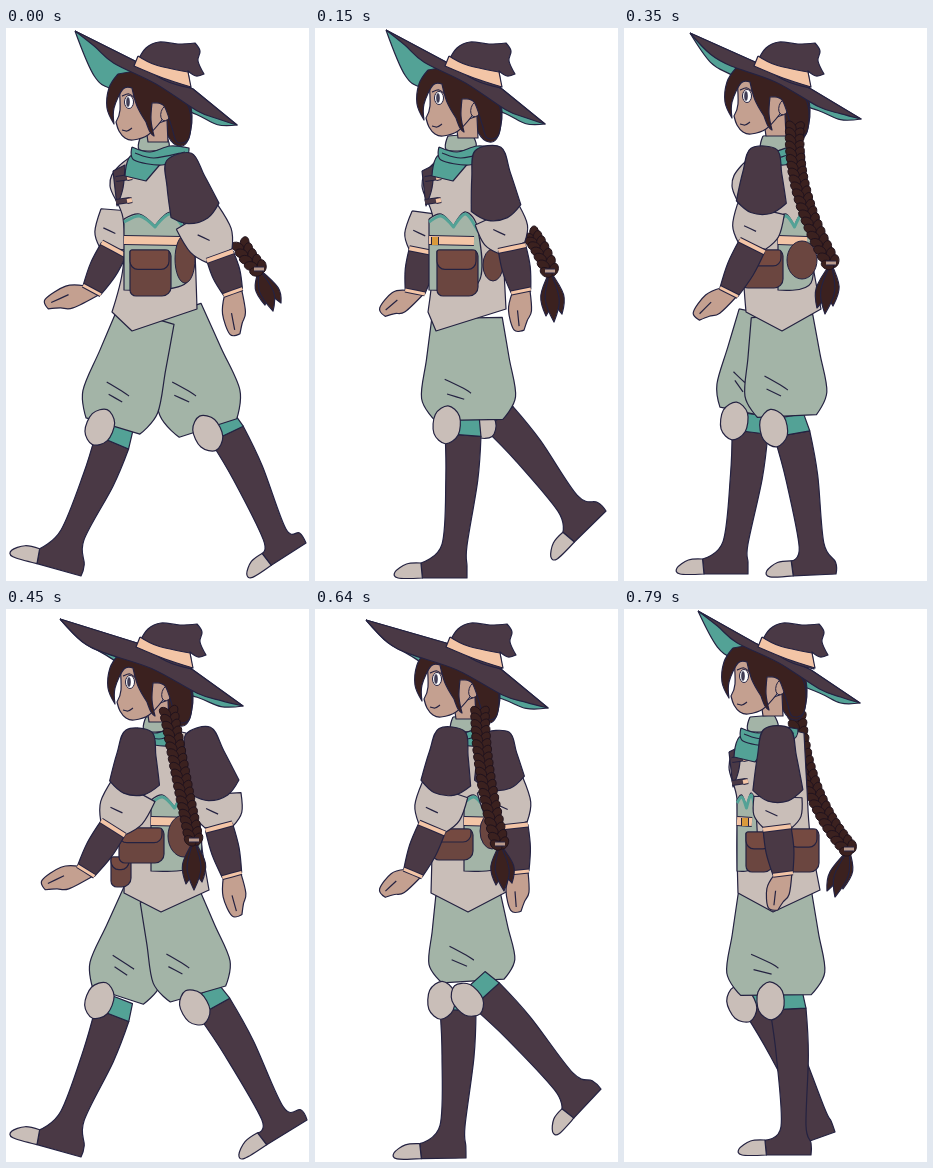
An HTML page with a canvas for the animation above (0.85 s loop, 303 px wide and 553 px high).

```html
<!DOCTYPE html>
<html lang="en">
<head>
<meta charset="utf-8">
<title>Walking witch</title>
<style>
html, body { margin: 0; width: 100%; height: 100%; overflow: hidden; background: #fff; }
canvas { display: block; }
</style>
</head>
<body>
<canvas id="stage" width="303" height="553"></canvas>
<script>
const ctx = document.getElementById('stage').getContext('2d');
const INK = '#242241', DARK = '#4a3945', CLOTH = '#c9beb8', SAGE = '#a3b4a7', TEAL = '#53a296',
  SKIN = '#c4a090', PEACH = '#f3c5a6', HAIR = '#3b211f', LEATHER = '#6b4640', FLAP = '#754a41',
  GOLD = '#d99a3c';

const move = (p, v, k) => [p[0] + v[0] * k, p[1] + v[1] * k];
const mix = (a, b, t) => [a[0] + (b[0] - a[0]) * t, a[1] + (b[1] - a[1]) * t];
const gap = (a, b) => Math.hypot(b[0] - a[0], b[1] - a[1]);
const toward = (a, b) => [(b[0] - a[0]) / gap(a, b), (b[1] - a[1]) / gap(a, b)];
const side = v => [-v[1], v[0]];
const corner = p => [p[0], p[1], true];
const pts = text => text.split(' ').map(s => [...s.split(',').map(parseFloat), s.endsWith('*')]);

// Smooth spline through the points; a true third item makes a sharp corner.
function trace(points, closed) {
  const n = points.length;
  const at = i => closed ? points[(i + n) % n] : points[Math.max(0, Math.min(n - 1, i))];
  const slope = (i, k) => at(i)[2] ? 0 : (at(i + 1)[k] - at(i - 1)[k]) / 6;
  ctx.beginPath();
  ctx.moveTo(points[0][0], points[0][1]);
  for (let i = 0; i < (closed ? n : n - 1); i++) {
    const a = at(i), b = at(i + 1);
    ctx.bezierCurveTo(a[0] + slope(i, 0), a[1] + slope(i, 1),
      b[0] - slope(i + 1, 0), b[1] - slope(i + 1, 1), b[0], b[1]);
  }
}
function ink(color = INK, width = 1.2) {
  ctx.strokeStyle = color;
  ctx.lineWidth = width;
  ctx.stroke();
}
function fill(color, line, width) {
  ctx.fillStyle = color;
  ctx.fill();
  ink(line, width);
}
function shape(color, points) { trace(points, true); fill(color); }
function fold(...points) { trace(points); ink(); }
function strap(a, b, width = 4, color = PEACH) {
  trace([a, b]);
  ink(INK, width + 2);
  ink(color, width);
}
function oval(color, x, y, rx, ry, turn = 0, line = INK) {
  ctx.beginPath();
  ctx.ellipse(x, y, rx, ry, turn, 0, 7);
  fill(color, line, 1);
}

// A limb of varying half-width along its joints [x, y, halfWidth].
function tube(color, joints) {
  const last = joints.length - 1;
  const edge = sign => joints.map((j, i) => {
    const dir = toward(joints[Math.max(0, i - 1)], joints[Math.min(last, i + 1)]);
    return [...move(j, side(dir), sign * j[2]), i === 0 || i === last];
  });
  shape(color, [...edge(1), ...edge(-1).reverse()]);
}

function leg({ knee, ankle, toe, heel, pants }) {
  const shin = toward(knee, ankle), front = side(shin), calf = mix(knee, ankle, .4);
  const foot = toward(heel, toe), up = side(foot), length = gap(heel, toe);
  const capTop = move(move(toe, foot, -.36 * length), up, 15);
  const capBase = corner(move(toe, foot, -.38 * length));
  shape(DARK, [
    corner(move(knee, front, 18)), move(calf, front, 14), move(ankle, front, 13),
    corner(capTop), capBase, corner(heel), move(heel, up, 12),
    move(ankle, front, -12), move(calf, front, -18), corner(move(knee, front, -18))
  ]);
  shape(CLOTH, [corner(capTop), move(move(toe, foot, -.16 * length), up, 14),
    move(toe, up, 6), move(toe, foot, -3), capBase]);
  const above = move(knee, shin, -18);
  tube(TEAL, [[...above, 15], [...knee, 18]]);
  if (pants) trousers(...pants);
  const patch = move(move(knee, front, 17), shin, -9), tilt = Math.atan2(shin[1], shin[0]);
  shape(CLOTH, [...Array(6).keys()].map(i => {
    const a = i * Math.PI / 3, v = Math.cos(a) * 19, w = Math.sin(a) * 14;
    return [patch[0] + v * Math.cos(tilt) - w * Math.sin(tilt),
      patch[1] + v * Math.sin(tilt) + w * Math.cos(tilt)];
  }));
}
function trousers(hip, hem, w) {
  tube(SAGE, [[...hip, w * .75], [...mix(hip, hem, .4), w * .88],
    [...mix(hip, hem, .78), w], [...hem, w * .72]]);
  const crease = mix(hip, hem, .6);
  fold(move(crease, [-1, 0], w * .5), move(crease, [-.3, 1], 10), move(crease, [.2, 1], 14));
  fold(move(crease, [-1, .7], w * .45), move(crease, [-.2, 1], 20));
}

function arm({ shoulder, hem, elbow, wrist, tip }) {
  const wide = shoulder ? 24 : 16;
  tube(CLOTH, [[...hem, wide], [...mix(hem, elbow, .6), wide * .4 + 14], [...elbow, 14]]);
  const puff = mix(hem, elbow, .55);
  fold(move(puff, [-1, -.3], 12), move(puff, [0, 1], 2));
  if (shoulder) {
    const down = toward(shoulder, hem), out = side(down);
    shape(DARK, [move(shoulder, out, 13), move(mix(shoulder, hem, .4), out, 20),
      corner(move(move(hem, out, 25), down, -7)), move(move(hem, out, 10), down, 4),
      move(move(hem, out, -10), down, 4), corner(move(move(hem, out, -25), down, -7)),
      move(mix(shoulder, hem, .4), out, -19), move(shoulder, out, -13)]);
  }
  const across = side(toward(elbow, wrist));
  const reach = toward(wrist, tip), flat = side(reach), palm = mix(wrist, tip, .5);
  shape(SKIN, [corner(move(wrist, across, 9)), move(palm, flat, 12), move(tip, flat, 6),
    corner(move(tip, flat, -4)), move(mix(wrist, tip, .75), flat, -7),
    move(palm, flat, -11), corner(move(wrist, across, -9))]);
  fold(move(palm, flat, 3), move(mix(wrist, tip, .9), flat, 1));
  tube(DARK, [[...elbow, 14], [...mix(elbow, wrist, .5), 14], [...wrist, 10]]);
  strap(move(elbow, across, 14), move(elbow, across, -14));
  strap(move(wrist, across, 10), move(wrist, across, -10), 3);
}

function torso(chest, waist, back, [left, mid, right]) {
  shape(CLOTH, [[145, 116, true], [chest + 9, 138], [chest, 158], [waist, 190], [waist, 240],
    [left, 284, true], [mid, 303, true], [right, 281, true], [back, 225], [back - 3, 180], [180, 124, true]]);
}
function corset(x, end) {
  const half = (end - x) / 2;
  shape(SAGE, [[x, 191, true], [x + half * .5, 186], [x + half, 198, true],
    [x + half * 1.5, 184], [end, 202], [end, 255], [x, 262, true]]);
  trace([[x, 194], [x + half * .5, 188], [x + half, 199, true], [x + half * 1.5, 186], [end, 203]]);
  ink(TEAL, 3);
  strap([x, 212], [end - 4, 213], 8);
}
function pouch(x, y, w, h) {
  ctx.beginPath();
  ctx.roundRect(x, y, w, h, [2, 6, 9, 6]);
  fill(LEATHER);
  ctx.beginPath();
  ctx.roundRect(x, y, w - 2, h * .42, [2, 2, 8, 8]);
  fill(FLAP);
}
function toggles(x) {
  shape(DARK, [[x + 3, 143, true], [x + 15, 137, true], [x + 13, 160], [x + 7, 178, true]]);
  for (const y of [151, 174]) {
    strap([x + 6, y], [x + 20, y - 2], 4, DARK);
    strap([x + 17, y - 1], [x + 22, y - 2], 4);
  }
}

function scarf(x, drape) {
  shape(SAGE, [[x + 9, 108, true], [x + 33, 106, true], [x + 36, 120], [x + 8, 122]]);
  if (drape) shape(TEAL, [[x, 127], [x - 7, 148, true], [x + 14, 153, true], [x + 31, 133, true]]);
  const end = x + (drape ? 57 : 44);
  shape(TEAL, [[x, 119, true], [x + 18, 124], [x + 38, 118], [end, 120, true],
    [end - 4, 130], [x + 30, 137], [x + 2, 132]]);
  fold([x + 3, 125], [x + 22, 130], [end - 4, 124]);
}

function braid(from, bend, end, tip) {
  for (const spread of [9, -7, 1]) {
    const point = [tip[0] + spread, tip[1] - Math.abs(spread)], belly = mix(end, point, .55);
    shape(HAIR, [corner(end), move(belly, [-1, 0], 7), corner(point), move(belly, [1, 0], 7)]);
  }
  const count = Math.round(gap(from, end) / 7);
  for (let i = 0; i <= count; i++) {
    const t = i / count, a = mix(from, bend, t), b = mix(bend, end, t), p = mix(a, b, t);
    const dir = toward(a, b), angle = Math.atan2(dir[1], dir[0]);
    for (const s of [-1, 1]) {
      const lobe = move(p, side(dir), 4 * s);
      oval(HAIR, lobe[0], lobe[1], 6.5, 4.4, angle - s * .7, '#21131d');
    }
  }
  strap(move(end, [-1, 0], 5), move(end, [1, 0], 5), 3, '#b99a8c');
}

function face() {
  shape(HAIR, pts('145,53* 178,66 186,88 181,114 170,117 160,104 156,85'));
  shape(SKIN, pts('140,100* 161,92* 162,114* 142,114*'));
  shape(SKIN, pts('113,55* 114,82 110,94* 113,103 119,110 127,112 142,107 156,92* 160,72 148,52*'));
  oval(SKIN, 160, 85, 5, 8, .3);
  fold([116, 102], [121, 103], [126, 100]);
  oval('#fff', 123, 74, 4.5, 6.5);
  oval('#555061', 122, 74, 1.2, 4.5);
  fold([116, 68], [123, 66], [130, 71]);
  shape(HAIR, pts('112,46* 103,60 101,80 108,96* 108,80 117,61 126,60* 131,78 140,94* 144,104 148,108* 145,92 146,75* 158,78 166,100 171,114 183,110 183,80 162,57 135,42*'));
}
function brim(color, left, right, offsets) {
  const spots = [.12, .24, .5, .75, .88];
  const rim = spots.map((t, i) => move(mix(left, right, t), [0, 1], offsets[i])).reverse();
  shape(color, [corner(left), [131, 34, true], [187, 61, true], corner(right), ...rim]);
}
function head({ shift: [dx, dy], left, right, crown, lip, under }) {
  brim(TEAL, left, right, [under, under + 2, 20, 13, 11]);
  ctx.save();
  ctx.translate(dx, dy);
  face();
  ctx.restore();
  brim(DARK, left, right, [lip, 8 + lip * .4, 6, 9, 5]);
  ctx.save();
  ctx.translate(crown, 0);
  shape(DARK, pts('131,34* 140,20 153,14 172,16 189,15* 194,23 192,33 198,46* 190,48 182,43* 184,60* 158,52'));
  shape(PEACH, pts('132,28* 150,37 182,44* 185,59* 157,50 128,38*'));
  ctx.restore();
}

const frontLeg = { ankle: [67, 507], toe: [4, 528], heel: [75, 548] };
const stride = {
  hat: { shift: [0, 0], left: [69, 3], right: [231, 97], crown: 0, lip: 4, under: 34 },
  braid: [[235, 217], [242, 230], [253, 241], [266, 284]],
  legs: [
    { knee: [221, 406], ankle: [269, 506], toe: [244, 551], heel: [300, 515], pants: [[165, 285], [202, 400], 42] },
    { ...frontLeg, knee: [106, 414], pants: [[140, 288], [107, 398], 39] }
  ],
  arms: [
    { hem: [111, 182], elbow: [108, 221], wrist: [86, 262], tip: [41, 277] },
    { shoulder: [173, 129], hem: [191, 189], elbow: [214, 228], wrist: [227, 264], tip: [230, 306] }
  ],
  torso: [104, 117, 189, [106, 126, 191]], corset: [118, 180], scarf: 126, toggles: 104,
  pouches: [[124, 222, 41, 46]], bag: [179, 231, 10, 24]
};
const pass = {
  hat: { shift: [1, -4], left: [71, 2], right: [230, 96], crown: 2, lip: 4, under: 34 },
  braid: [[216, 207], [226, 219], [235, 243], [238, 295]],
  legs: [
    { knee: [184, 390], ankle: [253, 475], toe: [240, 533], heel: [291, 483] },
    { knee: [148, 407], ankle: [140, 517], toe: [80, 550], heel: [152, 550], pants: [[152, 290], [154, 392], 47] }
  ],
  arms: [
    { hem: [113, 185], elbow: [108, 223], wrist: [100, 264], tip: [68, 285] },
    { shoulder: [173, 121], hem: [182, 187], elbow: [197, 220], wrist: [206, 263], tip: [205, 302] }
  ],
  torso: [107, 118, 188, [113, 121, 191]], corset: [114, 163], scarf: 124, toggles: 104,
  pouches: [[122, 222, 41, 46]], bag: [178, 237, 10, 16], buckle: 120
};
const upright = {
  hat: { shift: [-3, -7], left: [74, 2], right: [236, 94], crown: 6, lip: 4, under: 25 },
  braid: [[173, 108], [180, 188], [225, 240], [210, 289]],
  legs: [
    { knee: [137, 396], ankle: [190, 505], toe: [158, 542], heel: [211, 523] },
    { knee: [164, 400], ankle: [170, 517], toe: [115, 546], heel: [187, 546], pants: [[151, 284], [152, 386], 49] }
  ],
  arms: [
    { shoulder: [153, 120], hem: [154, 188], elbow: [153, 219], wrist: [159, 265], tip: [150, 300] }
  ],
  torso: [105, 113, 186, [114, 149, 196]], corset: [113, 132], scarf: 117, toggles: 102,
  pouches: [[122, 223, 27, 40], [165, 220, 30, 43]], buckle: 121
};
const turn = {
  hat: { shift: [0, -6], left: [66, 5], right: [237, 91], crown: 2, lip: 11, under: 19 },
  braid: [[171, 99], [167, 163], [207, 235], [200, 287]], behind: true,
  legs: [
    { knee: [126, 404], ankle: [112, 515], toe: [53, 546], heel: [124, 546], pants: [[135, 285], [115, 383], 27] },
    { knee: [168, 406], ankle: [188, 517], toe: [143, 549], heel: [212, 546], pants: [[158, 288], [163, 388], 41] }
  ],
  arms: [
    { shoulder: [140, 121], hem: [137, 181], elbow: [128, 218], wrist: [105, 264], tip: [73, 289] }
  ],
  torso: [108, 119, 187, [122, 158, 197]], corset: [154, 187], scarf: 130,
  pouches: [[118, 222, 41, 38]], bag: [178, 232, 15, 19]
};
const backStride = {
  hat: { shift: [1, -1], left: [54, 10], right: [237, 97], crown: 2, lip: 12, under: 12 },
  braid: [[163, 103], [175, 169], [188, 231], [187, 282]], behind: true,
  legs: [
    { ...frontLeg, knee: [106, 406], pants: [[145, 285], [112, 387], 37] },
    { knee: [208, 398], ankle: [267, 504], toe: [236, 551], heel: [301, 511], pants: [[163, 285], [192, 385], 40] }
  ],
  arms: [
    { shoulder: [133, 122], hem: [128, 181], elbow: [107, 219], wrist: [80, 262], tip: [38, 277] },
    { shoulder: [192, 122], hem: [211, 185], elbow: [213, 218], wrist: [226, 266], tip: [232, 306] }
  ],
  torso: [119, 119, 194, [118, 155, 203]], corset: [145, 192], scarf: 131,
  pouches: [[105, 248, 20, 30], [113, 219, 45, 35]], bag: [178, 227, 16, 21]
};
const backPass = {
  hat: { shift: [-1, -4], left: [51, 11], right: [233, 99], crown: 3, lip: 12, under: 12 },
  braid: [[165, 103], [166, 164], [185, 235], [188, 283]], behind: true,
  legs: [
    { knee: [143, 401], ankle: [138, 517], toe: [79, 550], heel: [151, 549], pants: [[153, 285], [158, 372], 43] },
    { knee: [171, 386], ankle: [249, 472], toe: [242, 527], heel: [286, 480] }
  ],
  arms: [
    { shoulder: [181, 124], hem: [185, 176], elbow: [199, 217], wrist: [204, 263], tip: [202, 302] },
    { shoulder: [137, 121], hem: [130, 181], elbow: [117, 219], wrist: [98, 264], tip: [68, 285] }
  ],
  torso: [115, 117, 190, [116, 153, 195]], corset: [149, 190], scarf: 129,
  pouches: [[118, 220, 40, 31]], bag: [177, 222, 12, 18]
};

function draw(pose) {
  ctx.fillStyle = '#fff';
  ctx.fillRect(0, 0, 303, 553);
  if (!pose.behind) braid(...pose.braid);
  pose.legs.forEach(leg);
  pose.arms.filter(a => !a.shoulder).forEach(arm);
  torso(...pose.torso);
  corset(...pose.corset);
  if (pose.toggles) toggles(pose.toggles);
  if (pose.buckle) strap([pose.buckle, 209], [pose.buckle, 217], 6, GOLD);
  pose.pouches.forEach(p => pouch(...p));
  if (pose.bag) oval(LEATHER, ...pose.bag);
  scarf(pose.scarf, !pose.behind);
  pose.arms.filter(a => a.shoulder).forEach(arm);
  head(pose.hat);
  if (pose.behind) braid(...pose.braid);
}

const schedule = [[150, stride], [250, pass], [350, upright], [450, turn],
  [550, backStride], [700, backPass], [850, upright]];
let shown = null;
function frame() {
  const time = performance.now() % 850;
  const pose = schedule.find(([end]) => time < end)[1];
  if (pose !== shown) draw(shown = pose);
  requestAnimationFrame(frame);
}
ctx.lineJoin = 'round';
frame();
</script>
</body>
</html>
```
